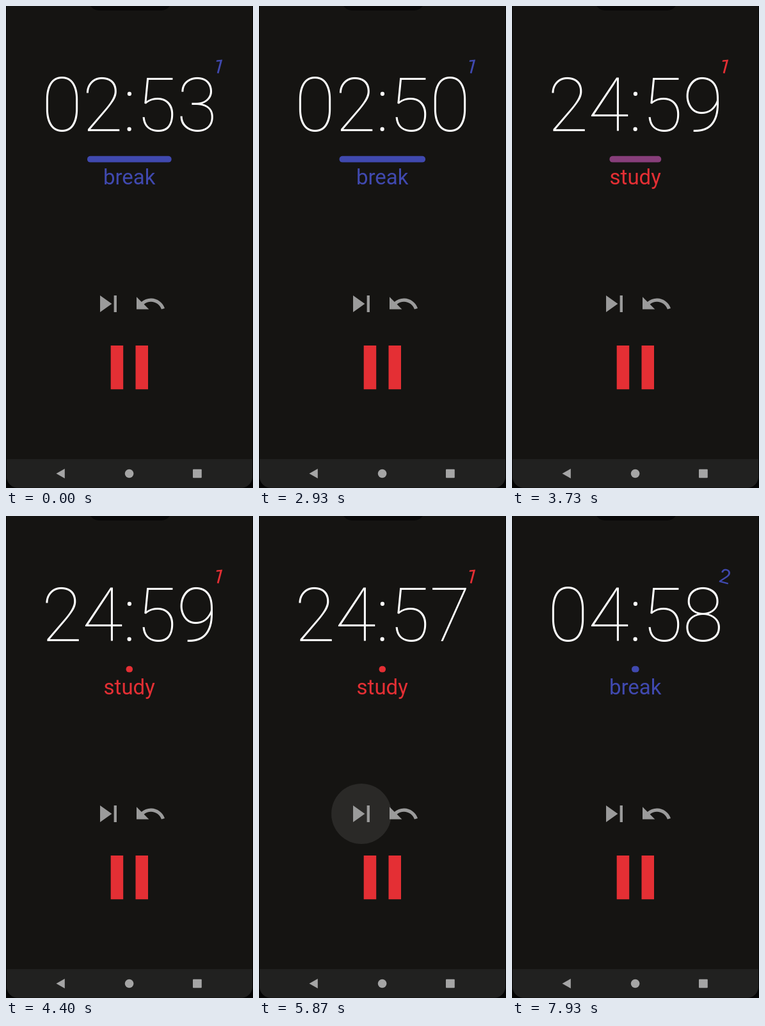
These frames come from a looping animation (386x751 px, 8 s). An HTML page with a canvas:

```html
<!DOCTYPE html>
<html lang="en">
<head>
<meta charset="utf-8">
<title>Study timer</title>
<style>
html, body { margin: 0; width: 100%; height: 100%; overflow: hidden; background: #000; }
canvas { display: block; width: 386px; height: 751px; }
</style>
</head>
<body>
<canvas id="stage"></canvas>
<script>
const W = 386, H = 751, LOOP = 8000;
const RED = [228, 47, 52], BLUE = [64, 73, 175];
const GRAY = '#9b9b9b';

const canvas = document.getElementById('stage');
const ctx = canvas.getContext('2d');
const dpr = window.devicePixelRatio || 1;
canvas.width = W * dpr;
canvas.height = H * dpr;

const SKIP = new Path2D('M6 18l8.5-6L6 6v12zM16 6v12h2V6h-2z');
const UNDO = new Path2D('M12.5 8c-2.65 0-5.05.99-6.9 2.6L2 7v9h9l-3.62-3.62c1.39-1.16 3.16-1.88 5.12-1.88 3.54 0 6.55 2.31 7.6 5.5l2.37-.78C21.08 11.03 17.15 8 12.5 8z');

const study = { label: 'study', color: RED, total: 1500 };
const rest = { label: 'break', color: BLUE, total: 300 };

// Each tick: start time, mode, seconds left, round
const ticks = [
  [-1530, rest, 174, 1],
  [-530, rest, 173, 1],
  [470, rest, 172, 1],
  [1470, rest, 171, 1],
  [2470, rest, 170, 1],
  [3470, study, 1499, 1],
  [4470, study, 1498, 1],
  [5400, study, 1497, 1],
  [6470, rest, 299, 2],
  [7470, rest, 298, 2]
].map(([at, mode, left, round]) => ({
  at, mode, left, round, part: 1 - left / mode.total
}));
const taps = [3200, 5465];

const clamp = v => Math.min(1, Math.max(0, v));
const mix = (a, b, k) => a + (b - a) * k;
const rgb = c => `rgb(${c.map(Math.round).join()})`;
const two = n => String(n).padStart(2, '0');

// cubic-bezier(.25, .1, .25, 1)
function ease(x) {
  if (x <= 0 || x >= 1) return clamp(x);
  let lo = 0, hi = 1, s = 0.5;
  const curve = (a, b) => 3 * a * s * (1 - s) ** 2 + 3 * b * s * s * (1 - s) + s ** 3;
  for (let i = 0; i < 24; i++) {
    s = (lo + hi) / 2;
    if (curve(0.25, 0.25) < x) lo = s; else hi = s;
  }
  return curve(0.1, 1);
}

function fill(color, build) {
  ctx.fillStyle = color;
  ctx.beginPath();
  build();
  ctx.fill();
}

function text(str, x, y, font, color) {
  ctx.font = `${font} Roboto, sans-serif`;
  ctx.fillStyle = color;
  ctx.fillText(str, x, y);
}

function icon(path, cx, cy, scale) {
  ctx.save();
  ctx.translate(cx, cy);
  ctx.scale(scale, scale);
  ctx.translate(-12, -12);
  ctx.fillStyle = GRAY;
  ctx.fill(path);
  ctx.restore();
}

function disc(x, y, r, color) {
  fill(color, () => ctx.arc(x, y, r, 0, 7));
}

function drawScreen() {
  ctx.fillStyle = '#050505';
  ctx.fillRect(0, 0, W, H);
  ctx.save();
  ctx.beginPath();
  ctx.roundRect(1, -20, W - 2, H + 19.5, 17);
  ctx.clip();
  ctx.fillStyle = '#151412';
  ctx.fillRect(0, 0, W, H);
  ctx.fillStyle = '#212120';
  ctx.fillRect(0, 706, W, 45);
  ctx.restore();
  fill('#080808', () => ctx.roundRect(130, -24, 128, 31, 15));

  fill('#a5a5a5', () => {
    ctx.moveTo(78.5, 728.5);
    ctx.lineTo(91.8, 721);
    ctx.lineTo(91.8, 736);
  });
  disc(192.6, 728.5, 6.8, '#a5a5a5');
  fill('#a5a5a5', () => ctx.roundRect(292, 721.7, 13.8, 13.6, 1));
}

function drawRipple(age) {
  if (age <= 0 || age >= 465) return;
  const fade = clamp((465 - age) / 200);
  disc(160, 464, 47, `rgba(204,204,204,${0.2 * clamp(age / 200) * fade})`);
  disc(160, 464, 47 * clamp(age / 265), `rgba(204,204,204,${0.2 * fade})`);
}

function drawTimer(t) {
  let i = ticks.length - 1;
  while (ticks[i].at > t) i--;
  const now = ticks[i], prev = ticks[i - 1];
  const k = ease((t - now.at) / 1000);
  const color = rgb(now.mode.color);

  ctx.textAlign = 'center';
  text(`${two(Math.floor(now.left / 60))}:${two(now.left % 60)}`, 193, 194.5, '100 116px', '#fff');
  text(now.mode.label, 192.7, 278, '400 33px', color);

  ctx.save();
  ctx.translate(333, 94);
  ctx.rotate(Math.PI / 12);
  text(now.round, 0, 11, '400 31px', color);
  ctx.restore();

  const len = 10 + 288 * mix(prev.part, now.part, k);
  const tint = prev.mode.color.map((c, n) => mix(c, now.mode.color[n], k));
  fill(rgb(tint), () => ctx.roundRect(192.8 - len / 2, 233.8, len, 9.8, 4.9));
}

function draw(t) {
  ctx.setTransform(dpr, 0, 0, dpr, 0, 0);
  drawScreen();
  drawTimer(t);
  taps.forEach(at => drawRipple(t - at));
  icon(SKIP, 160, 464, 2.16);
  icon(UNDO, 225.5, 464, 2.15);
  ctx.fillStyle = rgb(RED);
  ctx.fillRect(163.7, 529, 19.5, 68.2);
  ctx.fillRect(202.5, 529, 19.5, 68.2);
}

const start = performance.now();
function frame() {
  draw((performance.now() - start) % LOOP);
  requestAnimationFrame(frame);
}
frame();
</script>
</body>
</html>
```
